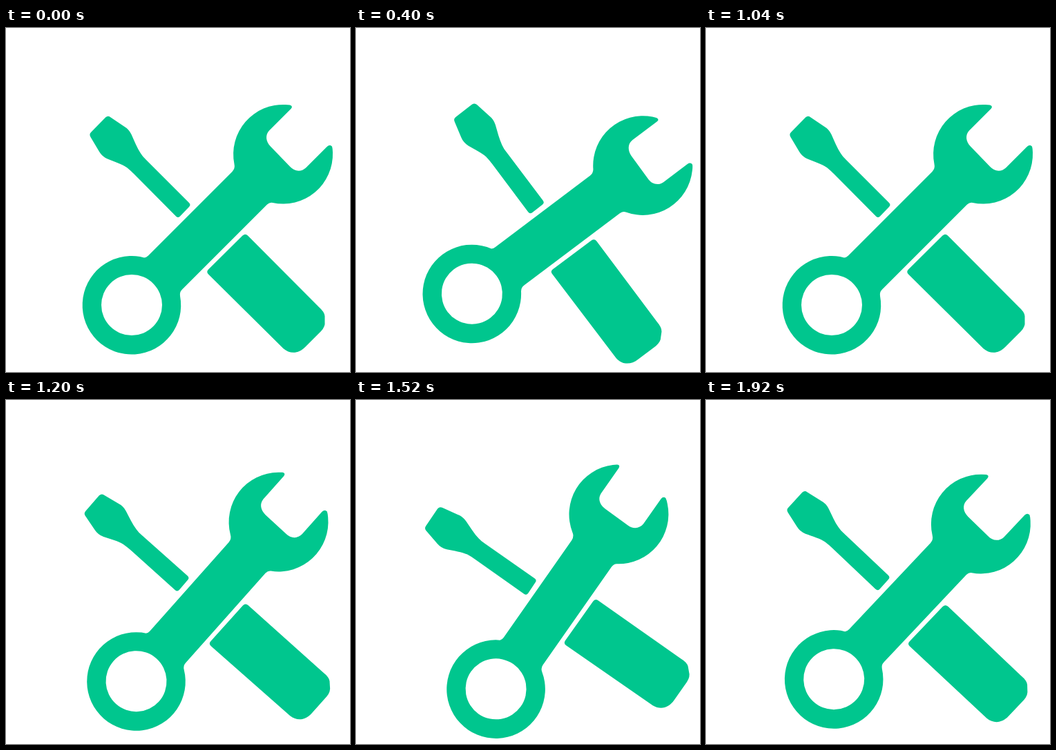
Animation, 498 px wide and 498 px high, one loop 2 s. Source, as an HTML page:

```html
<!DOCTYPE html>
<html lang="en">
<head>
<meta charset="utf-8">
<title>Tools</title>
<style>
  html, body { margin: 0; width: 100%; height: 100%; overflow: hidden; background: #fff; }
  svg { display: block; width: 100vw; height: 100vh; }
</style>
</head>
<body>
<svg viewBox="0 0 498 498">
  <g id="tools" fill="#00c68e">
    <!-- screwdriver blade -->
    <path d="M144 129.500 Q147.500 126.500 151 129 L171 142.500 Q178 146.500 181.500 154
      C186 164 190 174 195 181.500 Q198 186.500 203 191 L265 253 Q268 256 265 259
      L252 272.500 Q249 275.500 246 272.500 L185 211 Q180 206 175 202
      C168 197 157 193.500 147 189.500 Q139 186 135 179 L122.500 158 Q120 154 123 151 Z"/>
    <!-- screwdriver handle -->
    <path d="M342.500 300.500 Q346.500 297 350 300.500 L453 404 Q461 411 461.500 417 L461.500 425
      Q462.500 432 456 439 L433 462 C424 471 412 473 401.500 464 L293 356.500 Q289.500 353 293 349.500 Z"/>
    <!-- wrench -->
    <path d="M200 332.500 Q203 332.500 206 329.500 L327.500 208 Q332 203 330.500 197
      A72 72 0 0 1 405 111 L411 111.500 Q416 113 412.500 117 L381 148.500
      C375 155 376 164 383 171.500 L411 200.500 C417 207.500 427 209 434 202.500 L465 171.500
      Q469 168 472 171.500 Q473 175 473 180 A72 72 0 0 1 386 253
      Q382 252 378 255.500 L255 378.500 Q251 382.500 252 388 A71.300 71.300 0 1 1 194 331 Z"/>
    <circle cx="182" cy="401" r="44" fill="#fff"/>
  </g>
</svg>
<script>
  const LOOP = 2000, STEP = 80;
  const PIVOT = "291.5 292";
  // [step, degrees], linear in between
  const SWING = [[0, 0], [5, 10], [12, 0], [18, -10], [24, 0]];
  const tools = document.getElementById("tools");

  function angleAt(step) {
    const k = SWING.findIndex(([s]) => s > step);
    const [s0, a0] = SWING[k - 1], [s1, a1] = SWING[k];
    return a0 + (a1 - a0) * (step - s0) / (s1 - s0);
  }

  function draw(now) {
    // the rest pose is held for two ticks
    const step = Math.max(0, Math.floor((now % LOOP) / STEP) - 1);
    tools.setAttribute("transform", `rotate(${angleAt(step)} ${PIVOT})`);
  }

  const start = performance.now();
  function tick() {
    draw(performance.now() - start);
    requestAnimationFrame(tick);
  }
  tick();
</script>
</body>
</html>
```
